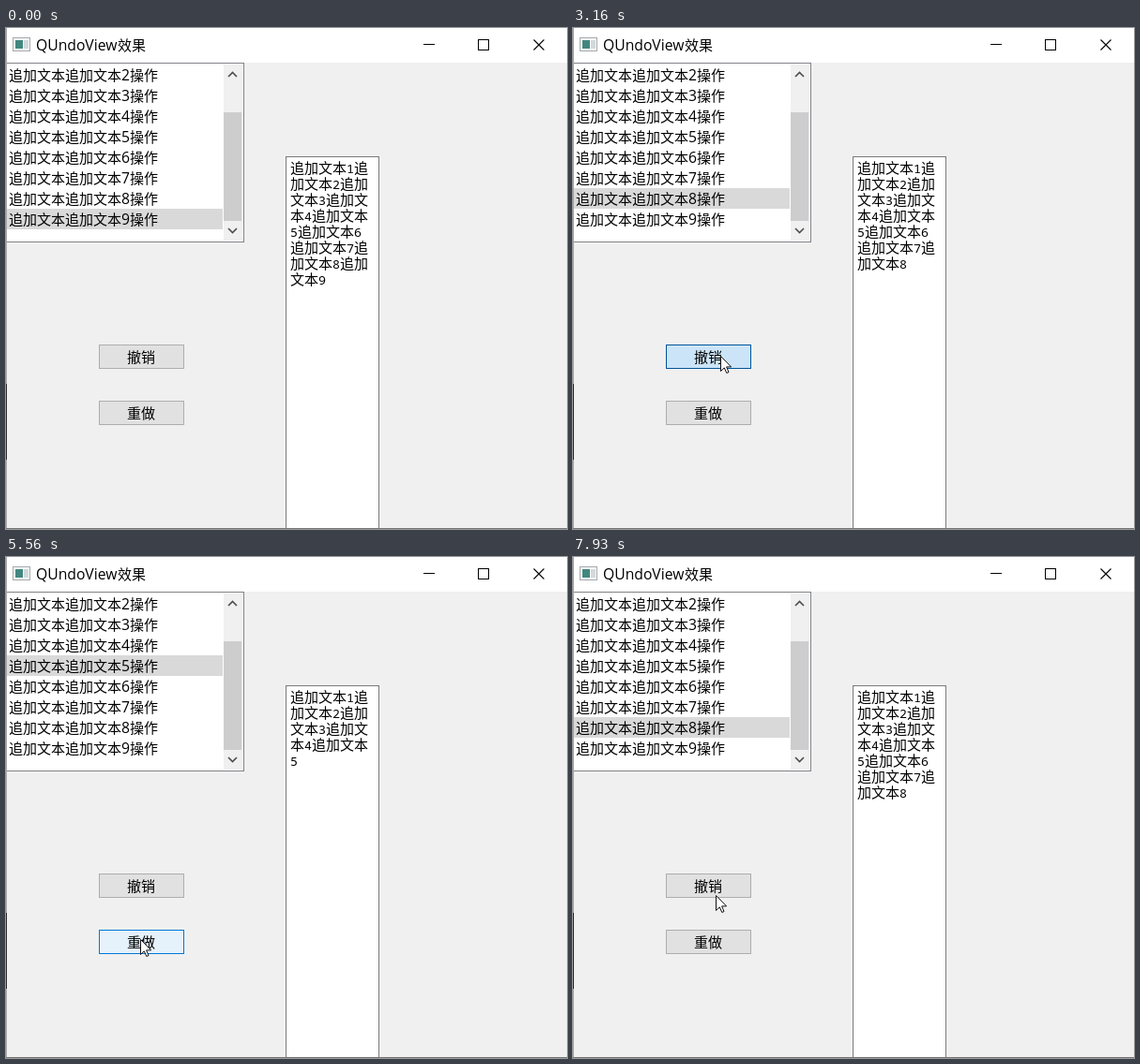
An HTML page that plays this animation: 598 by 535 pixels, repeating every 7990 ms.

```html
<!DOCTYPE html>
<html lang="zh-CN">
<head>
<meta charset="utf-8">
<title>QUndoView效果</title>
<style>
  html, body { margin: 0; width: 100%; height: 100%; overflow: hidden; background: #f0f0f0; }
  svg { display: block; width: 598px; height: 535px; }
  text { font: 15px "Noto Sans CJK SC", "Noto Sans CJK", sans-serif; fill: #000; }
  .thin text { font-weight: 300; }
  .latin { font: 15.7px "Open Sans", "Noto Sans", sans-serif; }
  .mono { font: 13.3px "Noto Sans Mono", monospace; }
  .crisp { shape-rendering: crispEdges; }
  .line { fill: none; stroke: #000; }
</style>
</head>
<body>
<svg viewBox="0 0 598 535">
  <g class="crisp">
    <rect width="598" height="535" fill="#f0f0f0"/>
    <rect width="598" height="37" fill="#fff"/>
    <rect x="7.5" y="10.5" width="18" height="14" fill="#fafafa" stroke="#a4a8ac"/>
    <rect x="10" y="13" width="8" height="9" fill="#41877f"/>
    <rect x="19" y="13" width="5" height="9" fill="#d3d8da"/>
    <path class="line" d="M445 17.5h12M503.5 12.5h11v11h-11z"/>
  </g>
  <path class="line" d="M562.5 12.5l11 11M573.5 12.5l-11 11" stroke-width="1.1"/>
  <text class="latin" x="32" y="24">QUndoView</text>
  <text x="119" y="24">效果</text>

  <g class="crisp">
    <rect x="0.5" y="37.5" width="253" height="191" fill="#fff" stroke="#7f8287"/>
    <rect id="mark" x="1" width="230" height="22" fill="#d9d9d9"/>
    <rect x="232" y="39" width="20" height="188" fill="#f0f0f0"/>
    <rect x="232" y="90" width="19" height="116" fill="#cdcdcd"/>
  </g>
  <path class="line" d="M237 52l4.5-4.5 4.5 4.5M237 214l4.5 4.5 4.5-4.5" style="stroke:#505050;stroke-width:1.7"/>
  <g id="rows"></g>

  <rect class="crisp" x="298.5" y="137.5" width="99" height="400" fill="#fff" stroke="#7a7a7a"/>
  <g id="edit" class="thin"></g>

  <g class="thin">
    <rect class="crisp" id="undo" x="99.5" y="338.5" width="90" height="25"/>
    <text x="129" y="356.5">撤销</text>
    <rect class="crisp" id="redo" x="99.5" y="398.5" width="90" height="25"/>
    <text x="129" y="416.5">重做</text>
  </g>

  <g class="crisp">
    <rect width="1" height="535" fill="#a9a9a9"/>
    <rect y="380" width="1" height="81" fill="#2b2b2b"/>
    <rect y="534" width="598" height="1" fill="#747474"/>
  </g>
  <path id="cursor" d="M.5 .5V16.5L4.3 12.9 6.8 18.5 9 17.5 6.6 11.9H11.6Z" fill="#fff" stroke="#111"/>
</svg>
<script>
const LOOP = 7990, PRESS = 120, FADE = 200;
const undoAt = [2070, 3160, 3870, 4580];
const redoAt = [5960, 6610, 7200];

const $ = id => document.getElementById(id);
const ramp = (t, a, b) => Math.max(0, Math.min(1, (t - a) / (b - a)));
const mix = (a, b, u) => a.map((v, i) => v + (b[i] - v) * u);
const linear = u => u;
const smooth = u => u * u * (3 - 2 * u);
const easeOut = u => 1 - (1 - u) ** 1.6;

// Pointer moves: start, end, target, easing
const entry = [271, 514];
const moves = [
  [930, 1410, [171, 367], easeOut],
  [1410, 1502, [157, 350], linear],
  [5060, 5400, [143, 408], smooth],
  [7590, 7930, [152, 361], smooth]
];

// Button looks: fill, edge
const normal = [[225, 225, 225], [173, 173, 173]];
const hot = [[229, 241, 251], [0, 120, 215]];
const down = [[204, 228, 247], [0, 84, 153]];

const digits = (s, cls) => s.replace(/\d/g, d => `<tspan class="${cls}">${d}</tspan>`);
const line = (x, y, s, cls) => `<text x="${x}" y="${y}">${digits(s, cls)}</text>`;

function wrap(s, width) {
  const lines = [''];
  let used = 0;
  for (const c of s) {
    const w = c < ':' ? 8 : 15;
    if (used + w > width) { lines.push(''); used = 0; }
    lines[lines.length - 1] += c;
    used += w;
  }
  return lines;
}

let rows = '';
for (let i = 2; i <= 9; i++) rows += line(3, 12 + 22 * i, `追加文本追加文本${i}操作`, 'latin');
$('rows').innerHTML = rows;

let shown;
function showItem(n) {
  if (n === shown) return;
  shown = n;
  $('mark').setAttribute('y', 22 * n - 5);
  let s = '';
  for (let i = 1; i <= n; i++) s += '追加文本' + i;
  $('edit').innerHTML = wrap(s, 88).map((l, i) => line(303, 155 + 17 * i, l, 'mono')).join('');
}

const done = (t, times) => times.filter(a => t >= a + PRESS).length;
const hover = (t, enter, leave) => ramp(t, enter, enter + FADE) - ramp(t, leave, leave + FADE);

function pressed(t, times) {
  const last = times.filter(a => t >= a).pop();
  return last === undefined ? 0 : 1 - ramp(t - last, PRESS, PRESS + FADE);
}

function paint(id, over, press) {
  ['fill', 'stroke'].forEach((name, i) => {
    const rgb = mix(mix(normal[i], hot[i], over), down[i], press);
    $(id).setAttribute(name, `rgb(${rgb.map(Math.round)})`);
  });
}

function pointer(t) {
  if (t < moves[0][0]) return [-50, -50];
  return moves.reduce((p, [a, b, to, ease]) => mix(p, to, ease(ramp(t, a, b))), entry);
}

function draw(t) {
  showItem(9 - done(t, undoAt) + done(t, redoAt));
  paint('undo', hover(t, 1440, 5240), pressed(t, undoAt));
  paint('redo', hover(t, 5360, 7730), pressed(t, redoAt));
  $('cursor').setAttribute('transform', `translate(${pointer(t).map(Math.round)})`);
}

const start = performance.now();
function tick() {
  draw((performance.now() - start) % LOOP);
  requestAnimationFrame(tick);
}
tick();
</script>
</body>
</html>
```
